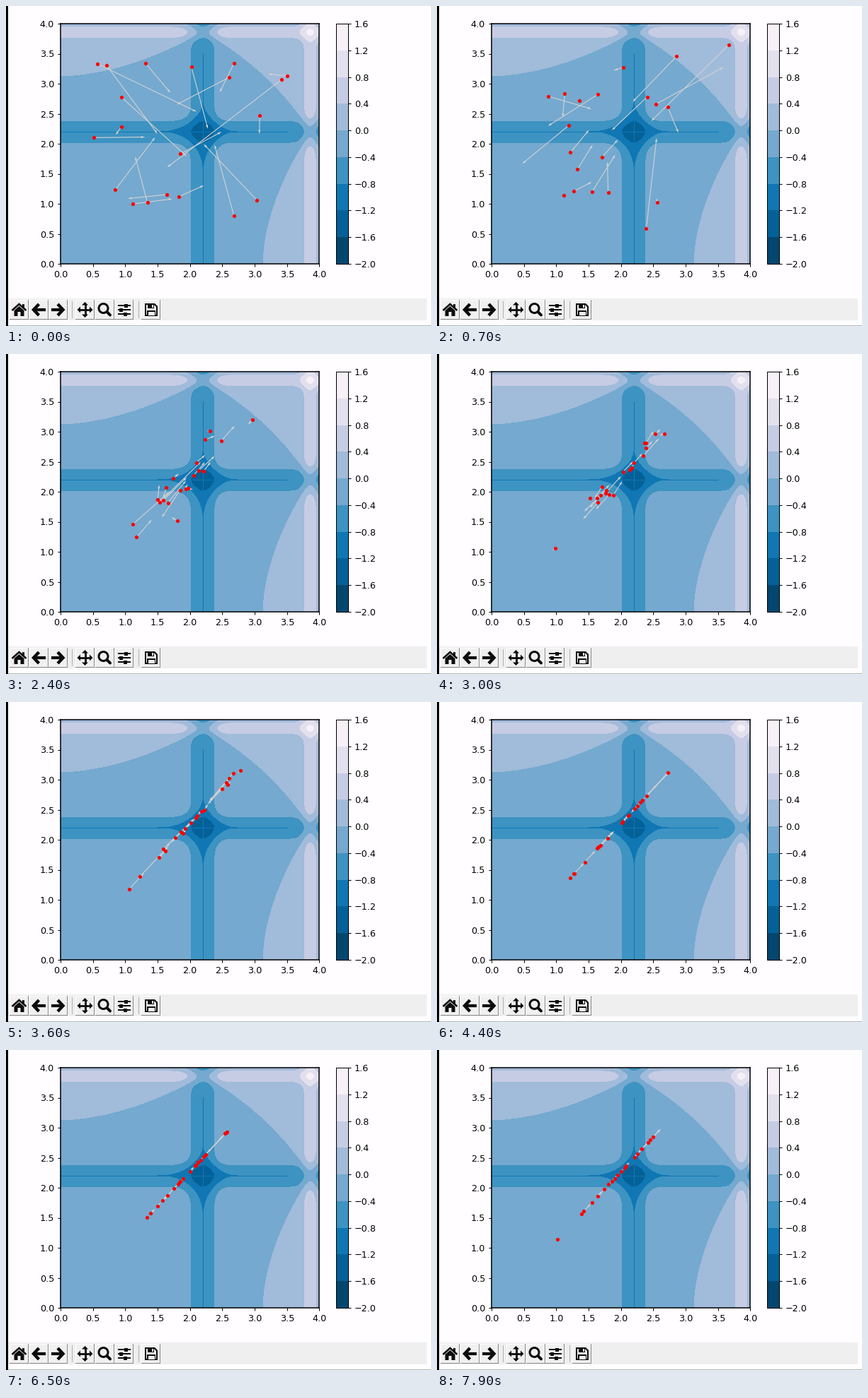
Recreate the animation shown at these times as a matplotlib script. Size 600 by 453 pixels, loop 8 s.

```python
import numpy as np
import matplotlib.pyplot as plt
from matplotlib.animation import FuncAnimation
from matplotlib.patches import Circle, Polygon, Rectangle

W, H, DPI = 600, 453, 100
FRAMES, STEP_MS = 80, 100
LEFT, RIGHT, TOP, BOTTOM = 77, 442.5, 25, 365
SCALE = 0.921

plt.rcParams.update({
    "font.family": "DejaVu Sans",
    "font.size": 10 * SCALE,
    "axes.linewidth": 1.1,
    "xtick.major.width": 0.8 * SCALE, "ytick.major.width": 0.8 * SCALE,
    "xtick.major.size": 3.5 * SCALE, "ytick.major.size": 3.5 * SCALE,
    "xtick.major.pad": 3.5 * SCALE, "ytick.major.pad": 3.5 * SCALE,
    "path.simplify": False,
    "toolbar": "None",
})


def wave(u):
    return -np.sin(u) * np.sin(u * u / np.pi) ** 20


# --- swarm ---------------------------------------------------------------
COUNT = 20
LEAD = np.array([1.98, 2.25])       # best point found by the swarm
ALONG = np.array([1, 1.154])        # line the swarm collapses onto
INERTIA, OWN, SOCIAL = 0.4, 1.7, 0.6


def run_swarm(seed=12):
    """Each dot is pulled to its own home and to the leader; the homes
    slide from scattered places onto one line through the leader."""
    rng = np.random.default_rng(seed)
    pos = rng.uniform((0.5, 0.45), (3.75, 3.5), (COUNT, 2))
    start = pos.copy()
    vel = (rng.uniform(0.2, 0.8, (COUNT, 1)) * (LEAD - pos)
           + rng.normal(0, 0.45, (COUNT, 2)))
    slot = rng.permutation(np.linspace(-1, 1, COUNT))[:, None]
    states = []
    for t in range(FRAMES):
        states.append((pos, vel))
        pos = np.clip(pos + vel, 0, 4)
        loose = np.exp(-(t / 18) ** 2)
        line = LEAD + slot * (1.05 - 0.35 * t / FRAMES) * ALONG
        home = loose * start + (1 - loose) * line
        r1, r2, kick = rng.random((3, COUNT, 1))
        shake = 0.7 * np.exp(-t / 22) + 0.1
        vel = (INERTIA * vel + OWN * r1 * (home - pos)
               + SOCIAL * r2 * (LEAD - pos) + shake * (kick - 0.5) * ALONG)
    return states


# --- plot ----------------------------------------------------------------
fig = plt.figure(figsize=(W / DPI, H / DPI), dpi=DPI, facecolor="#fffdff")


def px_axes(x0, y0, x1, y1):
    return fig.add_axes([x0 / W, 1 - y1 / H, (x1 - x0) / W, (y1 - y0) / H])


ax = px_axes(LEFT, TOP, RIGHT, BOTTOM)
grid = np.linspace(0, 4, 401)
field = wave(grid)[None, :] + wave(grid)[:, None]
levels = np.arange(-5, 5) * 0.4
filled = ax.contourf(grid, grid, field, levels=levels, cmap="PuBu_r")
# The valley floors are barely a pixel wide, so draw them as hairlines.
valley = grid[np.argmin(wave(grid))]
hair = dict(colors=[filled.cmap(filled.norm(-1))], lw=0.72)
ax.hlines(valley, 0, 3.5, **hair)
ax.vlines(valley, 0, 3.5, **hair)
ax.set(xlim=(0, 4), ylim=(0, 4),
       xticks=np.arange(0, 4.1, 0.5), yticks=np.arange(0, 4.1, 0.5))
bar = fig.colorbar(filled, cax=px_axes(466, TOP, 483, BOTTOM), ticks=levels)
bar.outline.set_linewidth(0.8 * SCALE)

states = run_swarm()
pos0, vel0 = states[0]
arrows = ax.quiver(*pos0.T, *vel0.T, angles="xy", scale_units="xy", scale=1,
                   width=0.003, color="lightgray", zorder=3)
dots, = ax.plot(*pos0.T, "o", color="red", ms=3.8, mew=0, zorder=4)

# --- window frame and toolbar --------------------------------------------
ui = fig.add_axes([0, 0, 1, 1], zorder=-1)
ui.set(xlim=(0, W), ylim=(H, 0))
ui.axis("off")
INK = "#0c0c0c"
FACE = "#f0f0f0"


def box(x, y, w, h, color):
    ui.add_patch(Rectangle((x, y), w, h, fc=color, lw=0))


def poly(pts, color=INK):
    ui.add_patch(Polygon(pts, fc=color, lw=0))


def stroke(xs, ys, px, cap="butt"):
    ui.plot(xs, ys, color=INK, lw=px * 72 / DPI, solid_capstyle=cap,
            solid_joinstyle="miter")


def button(x, w=27):
    box(x, 416, w, 28, "#8a8a8a")
    box(x, 416, w - 1, 27, "#fdfdfd")
    box(x + 1, 417, w - 2, 26, FACE)


def home(x, y):
    stroke([x - 10, x, x + 10], [y + 1, y - 8, y + 1], 2.6)
    box(x + 4, y - 8, 3, 6, INK)
    poly([(x - 7, y + 1), (x, y - 5), (x + 7, y + 1), (x + 7, y + 9),
          (x + 2, y + 9), (x + 2, y + 3), (x - 2, y + 3), (x - 2, y + 9),
          (x - 7, y + 9)])


def arrow(x, y, d):
    stroke([x - 9 * d, x + 7 * d], [y, y], 4.2)
    stroke([x, x + 7.5 * d, x], [y - 8, y, y + 8], 4.4)


def move(x, y):
    stroke([x - 8, x + 8], [y, y], 2.8)
    stroke([x, x], [y - 8, y + 8], 2.8)
    for dx, dy in ((1, 0), (-1, 0), (0, 1), (0, -1)):
        poly([(x + 11 * dx, y + 11 * dy),
              (x + 6.5 * dx + 4.5 * dy, y + 6.5 * dy + 4.5 * dx),
              (x + 6.5 * dx - 4.5 * dy, y + 6.5 * dy - 4.5 * dx)])


def zoom(x, y):
    ui.add_patch(Circle((x - 1.5, y - 2), 6.5, fill=False, ec=INK,
                        lw=3 * 72 / DPI))
    stroke([x + 3.5, x + 8], [y + 3, y + 7.5], 4, cap="round")


def sliders(x, y):
    for dy, knob in ((-6, 3), (0, -4), (6, 2)):
        stroke([x - 9, x + 9], [y + dy, y + dy], 2)
        box(x + knob - 3, y + dy - 2.5, 5, 5, INK)


def save(x, y):
    poly([(x - 9, y - 9), (x + 5, y - 9), (x + 9, y - 5), (x + 9, y + 9),
          (x - 9, y + 9)])
    poly([(x - 7, y - 7), (x + 4, y - 7), (x + 7, y - 4), (x + 7, y + 7),
          (x - 7, y + 7)], FACE)
    box(x - 5, y - 8, 9, 6, INK)
    box(x + 0.5, y - 7, 2, 4, FACE)
    box(x - 6, y + 1, 12, 7, INK)
    box(x - 4.5, y + 2.5, 9, 5, FACE)


box(0, 0, 3, H, "black")
box(3, 414, 591, 31, "#efefef")
box(3, 452, W - 3, 1, "#b8b8b8")
for first, number in ((5, 3), (98, 3), (191, 1)):
    for i in range(number):
        button(first + 27.5 * i)
for x in (93, 187):
    box(x, 418, 1, 24, "#b0b0b0")
home(18.5, 430)
arrow(46.5, 430, -1)
arrow(73, 430, 1)
move(111.5, 430)
zoom(139, 430)
sliders(167, 430)
save(205, 430)


def draw(t):
    pos, vel = states[t]
    arrows.set_offsets(pos)
    arrows.set_UVC(*vel.T)
    dots.set_data(*pos.T)
    return arrows, dots


anim = FuncAnimation(fig, draw, frames=FRAMES, interval=STEP_MS, repeat=True)
plt.show()
```
